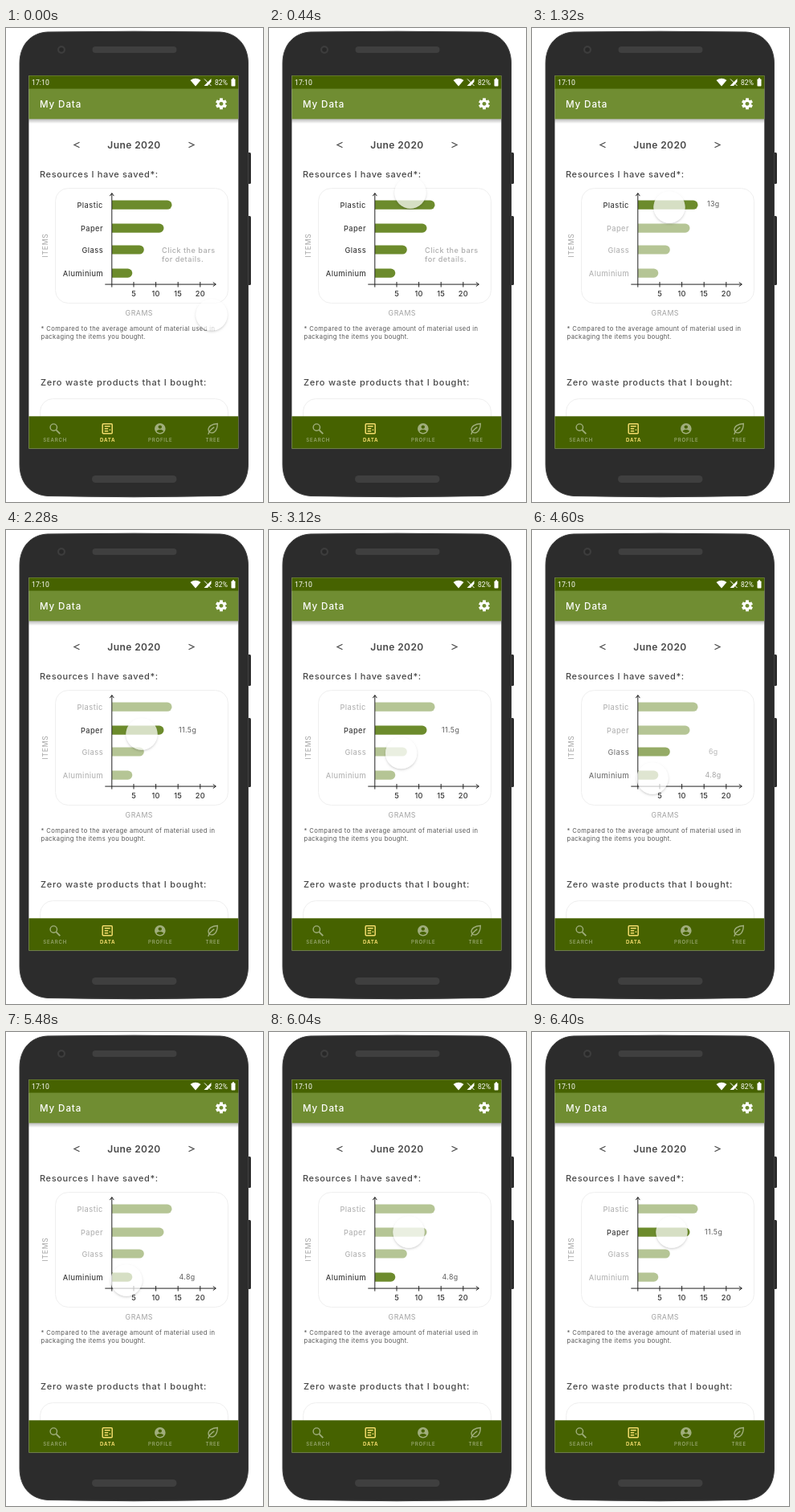
Write an HTML page with a canvas that moves like this. It is 320 px wide and 590 px high and loops after 6.56 s.

```html
<!DOCTYPE html>
<html lang="en">
<head>
<meta charset="utf-8">
<title>My Data</title>
<style>
html, body { margin: 0; width: 100%; height: 100%; overflow: hidden; background: #fff; }
canvas { display: block; width: 320px; height: 590px; }
</style>
</head>
<body>
<canvas id="stage"></canvas>
<script>
const W = 320, H = 590, LOOP = 6560;
const canvas = document.getElementById('stage');
const ctx = canvas.getContext('2d');
const dpr = window.devicePixelRatio || 1;
canvas.width = W * dpr;
canvas.height = H * dpr;

const SANS = 'Inter, "Open Sans", sans-serif';
const INK = '#484848', GREY = '#a2a2a2', GREEN = '#6c8b2c', DARK = '#466200';
const DIM = '#a0ae7c', GOLD = '#f3dc6c', EDGE = '#efefef';
const LEFT = 28.4, TOP = 59.2, WIDE = 260.9, TALL = 464.3;

// label, label x, bar middle, bar end, value, value x
const rows = [
  ['Plastic', 88.5, 220.2, 206.5, '13g', 218],
  ['Paper', 93, 249.1, 196.5, '11.5g', 215],
  ['Glass', 94.5, 276, 171.8, '6g', 220],
  ['Aluminium', 70.8, 305.1, 157.3, '4.8g', 215.5]
];

// start of each dissolve and the row it selects
const taps = [[800, 0], [1880, 1], [3240, 2], [4480, 3], [6040, 1]];
const FADE = 360;

// pointer stops: time, x, y
const stops = [
  [40, 256, 357], [440, 176, 205], [760, 171, 223], [1320, 171, 223],
  [1800, 169, 254], [2840, 169, 254], [3200, 164, 281], [3840, 164, 281],
  [4400, 150, 309], [5480, 150, 309], [5840, 174, 249]
];

const clamp = v => Math.max(0, Math.min(1, v));
const mix = (a, b, k) => a + (b - a) * k;
const smooth = k => k * k * (3 - 2 * k);

function paint(fill, stroke) {
  if (fill) { ctx.fillStyle = fill; ctx.fill(); }
  if (stroke) { ctx.strokeStyle = stroke; ctx.stroke(); }
}

function box(x, y, w, h, r, fill, stroke) {
  ctx.beginPath();
  ctx.roundRect(x, y, w, h, r);
  paint(fill, stroke);
}

function disc(x, y, r, fill, stroke) {
  ctx.beginPath();
  ctx.arc(x, y, r, 0, 7);
  paint(fill, stroke);
}

function shape(d, fill, stroke, width = 1) {
  const p = new Path2D(d);
  ctx.lineWidth = width;
  if (fill) { ctx.fillStyle = fill; ctx.fill(p); }
  if (stroke) { ctx.strokeStyle = stroke; ctx.stroke(p); }
}

function text(str, x, y, size, color, { weight = 400, gap = 0, align = 'left', font = SANS } = {}) {
  ctx.font = `${weight} ${size}px ${font}`;
  ctx.letterSpacing = gap + 'px';
  ctx.textAlign = align;
  ctx.fillStyle = color;
  ctx.fillText(str, x, y);
}

function at(x, y, draw) {
  ctx.save();
  ctx.translate(x, y);
  draw();
  ctx.restore();
}

function band(y, h, fill) {
  ctx.fillStyle = fill;
  ctx.fillRect(LEFT, y, WIDE, h);
}

function phone() {
  ctx.fillStyle = '#fff';
  ctx.fillRect(0, 0, W, H);
  box(300, 155, 5, 39, 1.5, '#2c2c2c');
  box(300, 234, 5, 86, 1.5, '#2c2c2c');
  shape('M17 44C17 22 30 6 52 5Q159 3.4 266 5C288 6 301.5 22 301.5 44V543C301.5 566 288 581 266 582.5Q159 585 52 582.5C30 581 17 566 17 543Z',
    '#2c2c2c', '#404040', 1);
  box(107.5, 23, 105, 8, 4, '#3f3f3f');
  box(107, 557, 105.5, 9, 4.5, '#3f3f3f');
  disc(69, 27, 5, '#3d3d3d');
  disc(69, 27, 2.8, '#282828');
  band(TOP, TALL, '#fff');
}

function bars() {
  const shade = ctx.createLinearGradient(0, 113, 0, 119);
  shade.addColorStop(0, 'rgba(0,0,0,.28)');
  shade.addColorStop(1, 'rgba(0,0,0,0)');
  band(113, 6, shade);
  band(75, 38.3, '#708d32');
  band(TOP, 16.4, DARK);

  const status = { font: 'Roboto, sans-serif', gap: 0.05 };
  text('17:10', 32, 71, 8.7, '#fff', status);
  text('82%', 260, 70.5, 8.5, '#fff', status);
  shape('M229.5 65Q236 60.3 242.5 65L236 72.4Z', '#fff');
  shape('M246.5 72L255.5 63V67L251 72Z', '#fff');
  shape('M247 63.5L255.5 72', null, '#fff', 1);
  box(280.5, 63.5, 5, 9, 0.8, '#fff');
  ctx.fillRect(282, 62.3, 2, 2);

  text('My Data', 42, 99.3, 11.6, '#fff', { weight: 500, gap: 0.9 });
  gear(268, 94.3);
}

function gear(x, y) {
  at(x, y, () => {
    ctx.fillStyle = '#fff';
    for (let i = 0; i < 6; i++) {
      ctx.rotate(Math.PI / 3);
      ctx.fillRect(-1.9, -7, 3.8, 4);
    }
    disc(0, 0, 5.2, '#fff');
    disc(0, 0, 2.4, '#708d32');
  });
}

function page() {
  const note = { gap: 0.43 };
  shape('M91.5 142.3L85 145.5L91.5 148.7M227.5 142.3L234 145.5L227.5 148.7', null, INK, 1.2);
  text('June 2020', 159.5, 149.8, 12, INK, { weight: 600, gap: 0.42, align: 'center' });
  text('Resources I have saved*:', 42, 186.3, 11, INK, { weight: 500, gap: 0.62 });
  ctx.lineWidth = 1;
  box(61.5, 199.5, 215, 143, 16, null, EDGE);

  at(52, 270.5, () => {
    ctx.rotate(-Math.PI / 2);
    text('ITEMS', 0, 0, 8.6, GREY, { gap: 0.7, align: 'center' });
  });
  text('GRAMS', 165.8, 357.6, 8.8, GREY, { gap: 0.5, align: 'center' });
  text('* Compared to the average amount of material used in', 43.5, 377.2, 7.6, '#555', note);
  text('packaging the items you bought.', 43.5, 386.6, 7.6, '#555', note);
  text('Zero waste products that I bought:', 43, 445.2, 11, INK, { weight: 500, gap: 0.77 });
  ctx.lineWidth = 1;
  box(42.5, 461.5, 234, 60, 16, null, EDGE);
}

function stateAt(t) {
  let from = -1, to = -1, k = 1;
  for (const [start, row] of taps) {
    if (t < start) break;
    from = to;
    to = row;
    k = 1 - (1 - clamp((t - start) / FADE)) ** 2;
  }
  return { from, to, k };
}

function chart(t) {
  const { from, to, k } = stateAt(t);
  const blend = test => mix(test(from), test(to), k);

  rows.forEach(([label, lx, y, end, value, vx], i) => {
    const strength = blend(s => s < 0 || s === i ? 1 : 0);
    ctx.globalAlpha = mix(0.5, 1, strength);
    box(132, y - 5.6, end - 132, 11.2, [0, 5.6, 5.6, 0], GREEN);
    ctx.globalAlpha = mix(0.38, 1, strength);
    text(label, lx, y + 3.5, 9.2, '#3c3c3c', { weight: 500, gap: 0.45 });
    ctx.globalAlpha = blend(s => s === i ? 1 : 0);
    text(value, vx, y + (i ? 3 : 2), 8.8, '#5c5c5c', { gap: 0.4 });
  });

  ctx.globalAlpha = blend(s => s < 0 ? 1 : 0);
  text('Click the bars', 194, 279.8, 9.1, '#adadad', { weight: 500, gap: 0.5 });
  text('for details.', 194, 291, 9.1, '#adadad', { weight: 500, gap: 0.5 });
  ctx.globalAlpha = 1;

  at(0.3, -0.4, () => {
    shape('M131.5 323V206M129 209.5L131.5 206L134 209.5M123 319.5H261M257.5 317L261 319.5L257.5 322', null, '#222', 1);
  });
  [5, 10, 15, 20].forEach((n, i) => {
    const x = 159 + i * 27.6;
    shape(`M${x} 316V322.5`, null, '#222', 1);
    text(n, x, 333.6, 9.2, '#333', { weight: 500, gap: 0.2, align: 'center' });
  });
}

function nav() {
  band(483.3, TOP + TALL - 483.3, DARK);
  ['SEARCH', 'DATA', 'PROFILE', 'TREE'].forEach((name, i) => {
    const on = i === 1;
    text(name, 61.2 + i * 65.5, 515, 6.1, on ? GOLD : DIM,
      { weight: on ? 700 : 500, gap: 0.8, align: 'center' });
  });

  ctx.lineWidth = 1.4;
  disc(59.3, 497.1, 4.2, null, DIM);
  shape('M62.5 500.3L67.3 505.1', null, DIM, 1.8);

  at(126.2, 498.8, () => {
    ctx.lineWidth = 1.5;
    box(-6, -6, 12, 12, 1, null, GOLD);
    shape('M-3.5 -3H3.5M-3.5 0H1M-3.5 3H1M2.5 1.5H4', null, GOLD, 1.4);
  });

  at(191.8, 498.8, () => {
    disc(0, 0, 6.8, DIM);
    disc(0, -2.2, 2.2, DARK);
    shape('M-4.3 3C-3 .6 3 .6 4.3 3C2.6 5.8 -2.6 5.8 -4.3 3Z', DARK);
  });

  at(257.3, 498.8, () => {
    shape('M6 -6.3C-1 -6 -5.5 -3 -5.3 1.5C-5 5 -1 6 2 4C5.5 1.5 6 -2 6 -6.3Z', null, DIM, 1.4);
    shape('M-5.5 7C-4.5 3 -2 .5 2 -2', null, DIM, 1.4);
  });
}

function pointerAt(t) {
  let a = stops[0];
  for (const b of stops) {
    if (t < b[0]) {
      const k = smooth(clamp((t - a[0]) / (b[0] - a[0] || 1)));
      return [mix(a[1], b[1], k), mix(a[2], b[2], k)];
    }
    a = b;
  }
  return [a[1], a[2]];
}

function pointer(t) {
  const [x, y] = pointerAt(t), r = 19.7;
  ctx.save();
  ctx.beginPath();
  ctx.rect(0, 0, W, H);
  ctx.arc(x, y, r, 0, Math.PI * 2);
  ctx.clip('evenodd');
  ctx.shadowColor = 'rgba(0,0,0,.2)';
  ctx.shadowBlur = 3 * dpr;
  ctx.shadowOffsetY = 1.5 * dpr;
  disc(x, y, r - 0.3, '#fff');
  ctx.restore();
  disc(x, y, r, 'rgba(255,255,255,.72)');
}

function draw() {
  const t = performance.now() % LOOP;
  ctx.setTransform(dpr, 0, 0, dpr, 0, 0);
  phone();
  page();
  chart(t);
  bars();
  nav();
  pointer(t);
  requestAnimationFrame(draw);
}

draw();
</script>
</body>
</html>
```
